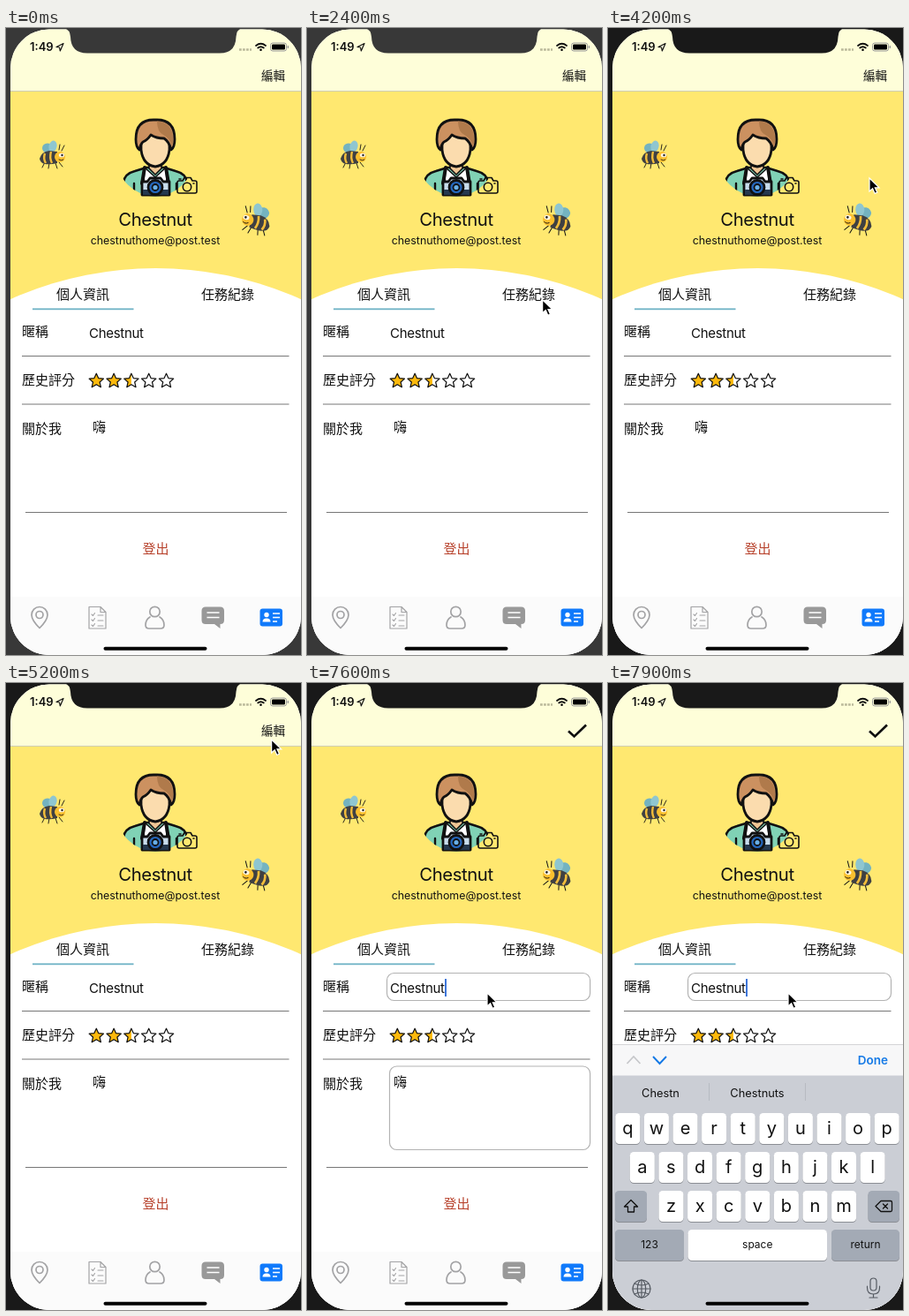
An HTML page that plays this animation: 334 by 710 pixels, repeating every 8000 ms.

```html
<!DOCTYPE html>
<html lang="zh-Hant">
<head>
<meta charset="utf-8">
<style>
  html, body { margin: 0; width: 100%; height: 100%; overflow: hidden; background: #1a1a1a; }
  svg { display: block; width: 334px; height: 710px; }
  text { font: 15px Inter, "Noto Sans CJK TC", "Noto Sans CJK", sans-serif; fill: #111; }
  .name { letter-spacing: -.02em; }
  .mid { text-anchor: middle; }
  .line { fill: none; stroke: #111; stroke-width: 1.6; stroke-linecap: round; stroke-linejoin: round; }
  .rule { stroke: #777; stroke-width: 1; }
  .gray { fill: none; stroke: #a3a3a5; stroke-width: 1.7; stroke-linecap: round; stroke-linejoin: round; }
  .field { fill: none; stroke: #b3b3b3; stroke-width: 1.2; }
</style>
</head>
<body>
<svg viewBox="0 0 334 710">
  <defs>
    <clipPath id="screen"><rect x="5" y="1.5" width="329" height="708.5" rx="44"/></clipPath>
    <clipPath id="round"><circle cx="169" cy="147" r="43.5"/></clipPath>
    <clipPath id="half"><rect x="-10" y="-10" width="10" height="20"/></clipPath>
    <path id="star" d="M0-8.3 2.4-2.9 8.2-2.4 3.8 1.5 5.1 7.2 0 4.2-5.1 7.2-3.8 1.5-8.2-2.4-2.4-2.9Z"/>
    <g id="bee">
      <path d="M-8 8l-3 6M-3 9l-1 6M4 9l2 6M8 8l4 5M11-5l3-6M8-6l1-6" class="line" style="stroke-width:.9"/>
      <ellipse cx="-5" cy="-8" rx="6" ry="5.5" fill="#74b3c0"/>
      <ellipse cx="1" cy="-10" rx="4.500" ry="6.500" fill="#8fc6d0" transform="rotate(15 1 -10)"/>
      <path d="M-14 4Q-12-4-3-5L6-4V9Q-2 11-8 10Q-13 9-14 4Z" fill="#3f4042"/>
      <path d="M-8-2Q-10 4-7 9M-1-4Q-3 3 0 9" fill="none" stroke="#f3bd3a" stroke-width="2.400"/>
      <circle cx="9" cy="2" r="6" fill="#fbc02f"/>
      <ellipse cx="11" cy="0" rx="3.200" ry="2.300" fill="#fff6e0"/>
      <circle cx="11.500" cy="0" r="1.200" fill="#222"/>
      <path d="M8 5q3 2 5 0" class="line" style="stroke-width:.8"/>
    </g>
  </defs>
  <rect id="bezel" width="334" height="710"/>
  <g clip-path="url(#screen)">
    <rect width="334" height="710" fill="#fff"/>
    <rect y="71" width="334" height="240" fill="#ffe870"/>
    <circle cx="169.5" cy="674" r="402" fill="#fff"/>
    <rect width="334" height="71" fill="#fefed9"/>
    <path d="M0 71.5H334" stroke="#cfceb4"/>

    <!-- status bar -->
    <text x="27" y="26" style="font-size:13px;font-weight:600">1:49</text>
    <path d="M57 21.5 65 17.5 61.3 26 60.5 22Z" class="line" style="stroke-width:1.2"/>
    <path d="M264 24.5h14" stroke="#bbb99b" stroke-width="2.6" stroke-dasharray="2.8 1.2"/>
    <path d="M283 20q5.500-4.500 11 0M285.200 22.500q3.300-2.600 6.600 0" class="line" style="stroke-width:1.8"/>
    <circle cx="288.5" cy="24.800" r="1.300"/>
    <rect x="299.500" y="17" width="18" height="9" rx="2.500" fill="none" stroke="#999"/>
    <rect x="301" y="18.500" width="15" height="6" rx="1.200"/>
    <path d="M319.300 20v3" stroke="#999" stroke-width="1.300"/>

    <text id="edit" x="289" y="59" style="font-size:13.500px;font-weight:500">編輯</text>
    <path id="check" d="M296 54.500l6.500 6L316 47.500" fill="none" stroke-width="2.600"/>

    <!-- avatar -->
    <g clip-path="url(#round)" class="line">
      <path d="M133 195V175q1-10 13-13l13-4h20l13 4q12 3 13 13v20Z" fill="#80d2b5" style="stroke-width:2.600"/>
      <path d="M157 158l12 11 12-11 2 32h-28Z" fill="#fff"/>
      <path d="M162 150v9l7 7 7-7v-9" fill="#efc594"/>
      <path d="M157 158l-3 18M181 158l3 18" style="stroke-width:4"/>
      <path d="M145 176v16M193 176v16" style="stroke-width:2.400"/>
    </g>
    <g class="line" style="stroke-width:2.800">
      <path d="M153 120v18q2 17 16 19 14-2 16-19v-18Z" fill="#fbdcae"/>
      <path d="M151 138q-4-3-4-12 0-22 20-22h4q20 0 20 22 0 9-4 12-2-9-8-13-9 0-15-4-4 6-9 8-3 3-4 9Z" fill="#cc9160"/>
      <path d="M171 105.500q18 1 18 21 0 4-1 7-3-9-9-12-8-3-8-16Z" fill="#b07a4b" stroke="none"/>
      <path d="M154 174h6l3-4h12l3 4h7v15h-31Z" fill="#c8dcec"/>
      <path d="M155 183h29v6h-29Z" fill="#25384e" stroke="none"/>
      <circle cx="169" cy="180.500" r="8" fill="#2567bd"/>
      <circle cx="169" cy="180.500" r="3.500" fill="#68aee6" style="stroke-width:1.800"/>
    </g>
    <g class="line">
      <path d="M196 173h4l2-3.500h7l2 3.500h3q2 0 2 2v10q0 2-2 2h-18q-2 0-2-2v-10q0-2 2-2Z"/>
      <circle cx="205" cy="180" r="4.700"/>
      <path d="M196 171h2M212 176h1"/>
    </g>

    <use href="#bee" transform="translate(52 144)"/>
    <use href="#bee" transform="translate(284 217) scale(-1.120 1.120) rotate(-12)"/>
    <text class="mid name" x="169" y="223.500" style="font-size:20.300px">Chestnut</text>
    <text class="mid" x="169" y="245" style="font-size:12.400px">chestnuthome@post.test</text>

    <text x="57" y="306.500">個人資訊</text>
    <text id="tasksTab" x="221" y="306.500">任務紀錄</text>
    <rect id="underline" x="30" y="317.400" width="114.500" height="1.800" fill="#70b3c6"/>

    <g id="info">
      <text x="18" y="349">暱稱</text>
      <text x="18" y="403.500">歷史評分</text>
      <text x="18" y="458.500">關於我</text>
      <g id="fields" class="field">
        <rect x="90.500" y="328.500" width="230" height="31" rx="8"/>
        <rect x="93.500" y="434" width="227" height="94.500" rx="8"/>
      </g>
      <text class="name" x="94" y="350.500" style="font-size:15px">Chestnut</text>
      <rect id="caret" x="156" y="335" width="2" height="20" fill="#3d75d9"/>
      <text x="98" y="457">嗨</text>
      <path class="rule" d="M18 371.500H320.500M18 426H320.500M22 548.500H318"/>
      <g id="bigStars"></g>
      <text x="154.500" y="595" style="fill:#b8432d">登出</text>
    </g>

    <g id="tasks">
      <g class="line" style="stroke-width:2">
        <path d="M20.500 334h34v40h-34Z" fill="#fbcf6c"/>
        <path d="M29.500 350v14h16v-14l-8-7Z" fill="#f3a545"/>
        <path d="M26 352l11.500-10.500L49 352M35 364v-8h5v8" style="stroke-width:2.400"/>
        <path d="M55 348h17q4 0 5 5l3 13v18H55Z" fill="#e9694a"/>
        <path d="M63 353h8l3 11H63Z" fill="#bcd9e6"/>
        <path d="M19.500 374h36v9h-36Z" fill="#4b566b"/>
        <path d="M59 369h4"/>
        <circle cx="34" cy="382" r="7" fill="#39424f"/><circle cx="34" cy="382" r="2.500" fill="#dfe5ec" stroke="none"/>
        <circle cx="69" cy="382" r="7" fill="#39424f"/><circle cx="69" cy="382" r="2.500" fill="#dfe5ec" stroke="none"/>
      </g>
      <g id="smallStars"></g>
      <text x="319" y="345" text-anchor="end" style="font-size:9.700px">2020-03-14 01:43</text>
      <text x="98" y="379" style="font-size:13.400px">給錢大方</text>
      <path class="rule" d="M18 406H320.500"/>
    </g>

    <!-- tab bar -->
    <rect y="644" width="334" height="66" fill="#fbfbfb"/>
    <g class="gray">
      <path d="M38 679.500q-9-9-9-15a9 9 0 0 1 18 0q0 6-9 15Z"/><circle cx="38" cy="664.500" r="4"/>
      <path d="M94 655.500h13l6 6v18.500H94ZM107 655.500v6h6" style="stroke-width:1.200"/>
      <path d="M97 664l1.500 1.500 2-3M97 670l1.500 1.500 2-3M97 676l1.500 1.500 2-3M104 665h6M104 671h6M104 677h6" style="stroke-width:1.100"/>
      <circle cx="168.500" cy="661" r="5.700"/>
      <path d="M163 667q-5 3-5 9 0 4 4 4h13q4 0 4-4 0-6-5-9"/>
    </g>
    <path d="M226 655.500h16.500q4.500 0 4.500 4.500v10.500q0 4.500-4.500 4.500v5l-6.500-5H226q-4.500 0-4.500-4.500V660q0-4.500 4.500-4.500Z" fill="#999"/>
    <path d="M227.500 662h14M227.500 667.500h14" stroke="#fff" stroke-width="1.600"/>
    <rect x="287.500" y="657.500" width="25.500" height="20" rx="3" fill="#107afb"/>
    <circle cx="295" cy="664.500" r="2.700" fill="#fff"/>
    <path d="M290.500 672.500q0-4 4.500-4t4.500 4Z" fill="#fff"/>
    <path d="M302 663h8M302 667.500h8M302 672h5" stroke="#fff" stroke-width="1.700"/>

    <g id="keyboard">
      <rect y="409" width="334" height="302" fill="#cbced5"/>
      <rect y="409" width="334" height="35.500" fill="#f7f7f8"/>
      <path d="M0 409.500H334" stroke="#d4d4d6"/>
      <path d="M21.500 431l7.500-8 7.500 8" fill="none" stroke="#c6c7ca" stroke-width="1.700"/>
      <path d="M51 423l7.500 8 7.500-8" fill="none" stroke="#1479e6" stroke-width="1.900"/>
      <text x="317" y="432" text-anchor="end" style="font-size:13.500px;font-weight:600;fill:#1479e6">Done</text>
      <text class="mid" x="59.500" y="469" style="font-size:12.800px">Chestn</text>
      <text class="mid" x="169" y="469" style="font-size:12.800px">Chestnuts</text>
      <path d="M114.500 453v20M223.500 453v20" stroke="#b7bbc2"/>
      <g id="keys"></g>
      <path class="line" style="stroke-width:1.300" d="M26 586l7.500 7.500h-4v6h-7v-6h-4ZM309 587h11q1.500 0 1.500 1.500v9q0 1.500-1.500 1.500h-11l-6-6ZM311.500 590.500l5 5M316.500 590.500l-5 5" transform="translate(0 -.5)"/>
      <g class="line" style="stroke:#555a62;stroke-width:1.200">
        <circle cx="38" cy="686" r="10"/><ellipse cx="38" cy="686" rx="4.700" ry="10"/>
        <path d="M28 686h20M38 676v20M30 680q8 4 16 0M30 692q8-4 16 0"/>
        <rect x="297" y="674" width="7" height="14" rx="3.500"/>
        <path d="M293.500 683v2q0 7 7 7t7-7v-2M300.500 692v4M296 696h9"/>
      </g>
    </g>
    <rect x="110.500" y="700.800" width="117" height="4" rx="2" fill="#050505"/>
  </g>
  <path id="notch" d="M66 0Q72.500 2 73 10 73.500 28.500 92 28.500H242Q260 28.500 260.500 10 261 2 267 0Z"/>
  <path id="cursor" d="M0 0V15l3.600-3.200 2.500 5.600 2.700-1.200-2.500-5.400H11Z" fill="#000" stroke="#fff" stroke-width="1.200"/>
</svg>
<script>
const $ = id => document.getElementById(id);
const DURATION = 8000, STEP = 100;

function addStars(id, x, y, pitch, scale) {
  $(id).innerHTML = [1, 1, .5, 0, 0].map((fill, i) => `
    <g transform="translate(${x + i * pitch} ${y}) scale(${scale})">
      ${fill ? `<use href="#star" fill="#fdb90c" ${fill < 1 ? 'clip-path="url(#half)"' : ''}/>` : ''}
      <use href="#star" class="line" style="stroke-width:1.200"/>
    </g>`).join('');
}

function key(x, y, width, label = '', size = 20, color = '#fff') {
  return `<rect x="${x}" y="${y + 1}" width="${width}" height="35" rx="4.500" fill="#8b8e94"/>
    <rect x="${x}" y="${y}" width="${width}" height="35" rx="4.500" fill="${color}"/>
    <text class="mid" x="${x + width / 2}" y="${y + 17.5 + size * .33}" style="font-size:${size}px">${label}</text>`;
}

function addKeys() {
  const dark = '#a3aab5';
  const rows = [['qwertyuiop', 8.3], ['asdfghjkl', 24.8], ['zxcvbnm', 57.5]];
  $('keys').innerHTML = rows.map(([letters, x], row) =>
    [...letters].map((c, i) => key(x + i * 32.6, 487 + row * 44, 28, c)).join('')).join('')
    + key(8, 575, 36, '', 12, dark) + key(294.5, 575, 35.5, '', 12, dark)
    + key(8, 619, 78, '123', 12, dark) + key(90.5, 619, 157.5, 'space', 12)
    + key(253, 619, 77, 'return', 12, dark);
}

const clamp = v => Math.min(1, Math.max(0, v));
const progress = (t, start, length) => clamp((t - start) / length);
const smooth = p => p * p * (3 - 2 * p);
const show = (id, visible) => $(id).style.display = visible ? '' : 'none';

// time, x, y of the pointer tip
const pointerPath = [
  [1200, 340, 56], [1300, 332, 59], [1600, 287, 205], [1900, 287, 205], [2500, 265, 316],
  [2900, 265, 316], [3400, 88, 304], [3700, 88, 304], [4200, 296, 170], [4700, 302, 62],
  [5500, 300, 65], [6400, 300, 65], [6800, 216, 428], [6900, 216, 428], [7400, 204, 351], [8000, 204, 351]
];

function pointerAt(t) {
  const i = Math.max(1, pointerPath.findIndex(p => p[0] >= t));
  const [t0, x0, y0] = pointerPath[i - 1], [t1, x1, y1] = pointerPath[i];
  const p = smooth(progress(t, t0, t1 - t0));
  return [x0 + (x1 - x0) * p, y0 + (y1 - y0) * p];
}

function render(t) {
  const focused = t >= 2500, editing = t >= 6100, onTasks = t >= 2700 && t < 3600;
  for (const id of ['bezel', 'notch']) $(id).setAttribute('fill', focused ? '#191919' : '#383838');

  show('info', !onTasks);
  show('tasks', onTasks);
  const slide = smooth(progress(t, 2600, 200)) - smooth(progress(t, 3500, 200));
  $('underline').setAttribute('x', 30 + 163.5 * slide);
  $('tasksTab').style.opacity = t >= 2700 && t < 3000 ? .9 : 1;

  show('edit', !editing);
  show('check', editing);
  show('fields', editing);
  const shade = 178 - 163 * progress(t, 6200, 300);
  $('check').setAttribute('stroke', `rgb(${shade},${shade},${shade})`);

  show('caret', t >= 7600);
  const rise = 1 - (1 - progress(t, 7600, 300)) ** 3;
  show('keyboard', rise > 0);
  $('keyboard').setAttribute('transform', `translate(0 ${301 * (1 - rise)})`);

  show('cursor', t >= 1300);
  $('cursor').setAttribute('transform', `translate(${pointerAt(t)})`);
}

addStars('bigStars', 102.3, 399.5, 19.8, 1);
addStars('smallStars', 104, 341.5, 17.3, .88);
addKeys();

const start = performance.now();
function tick() {
  const t = (performance.now() - start) % DURATION;
  render(Math.floor(t / STEP) * STEP);
  requestAnimationFrame(tick);
}
tick();
</script>
</body>
</html>
```
